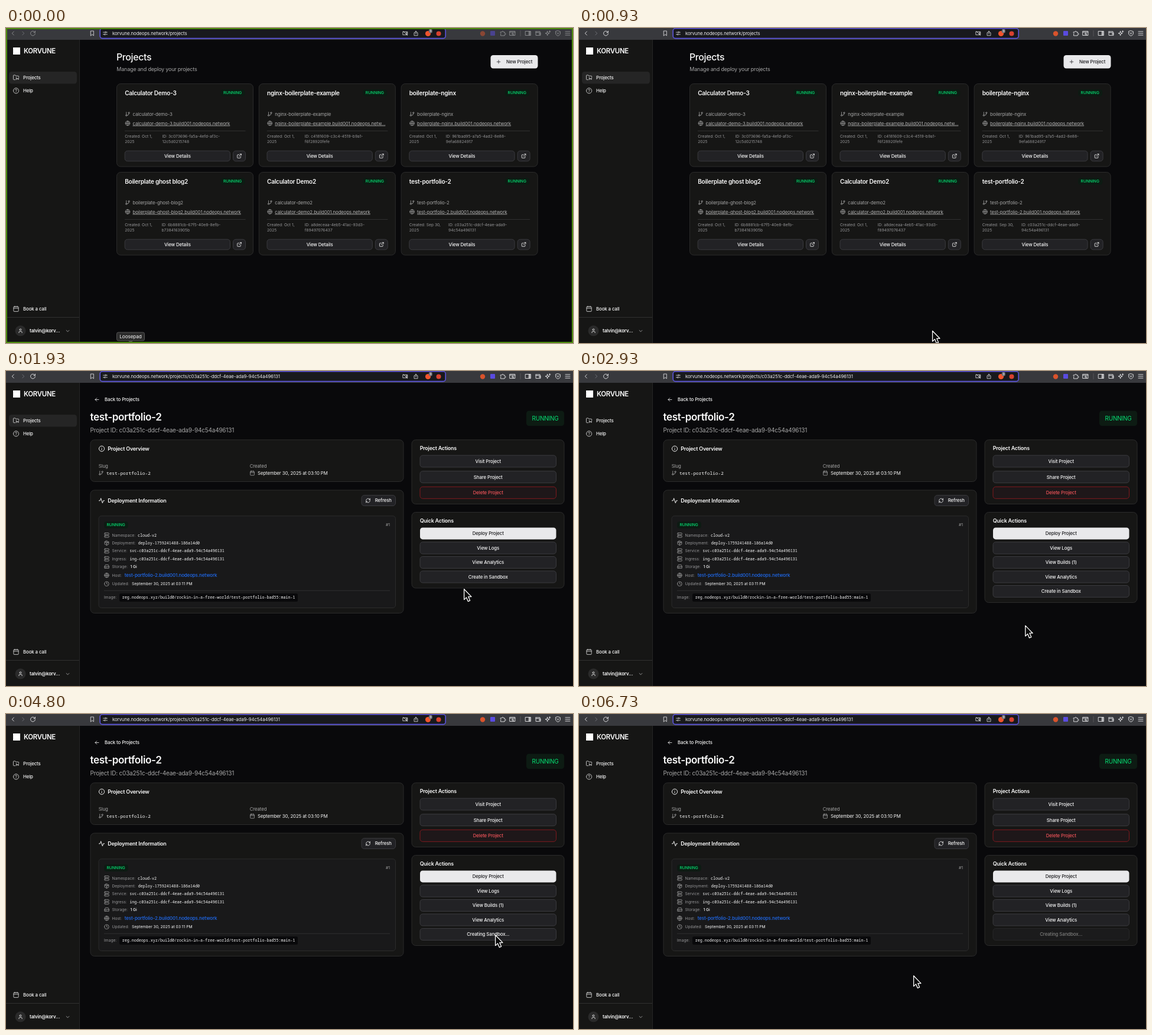
These frames come from a looping animation (960 by 534 pixels, 8000 ms). An HTML page:

```html
<!DOCTYPE html>
<html lang="en">
<head>
<meta charset="utf-8">
<title>Projects</title>
<style>
  html, body { margin: 0; width: 100%; height: 100%; overflow: hidden; background: #09090b; }
  svg { display: block; width: 960px; height: 534px; }
  text { font-family: Inter, sans-serif; white-space: pre; }
  .mono { font-family: "Noto Sans Mono", monospace; }
  .link { text-decoration: underline; text-decoration-thickness: .6px; text-underline-offset: 1.6px; }
</style>
</head>
<body>
<svg id="stage" viewBox="0 0 960 534"></svg>
<script>
const LOOP = 8000;
const WHITE = '#fafafa', GREY = '#a6a6a6', DIM = '#969698', GREEN = '#05df72', INK = '#18181b';
const PANEL = '#161615', LINE = '#2b2b2b', BUTTON = '#222225', EDGE = '#3a3a3e', LIGHT = '#e9e9eb', BADGE = '#0d1b13';

const ring = (x, y, r) => `M${x - r} ${y}a${r} ${r} 0 1 0 ${2 * r} 0a${r} ${r} 0 1 0 ${-2 * r} 0`;
const disc = ring(12, 12, 10);
const ICONS = {
  back: 'M15 5 8 12l7 7',
  forward: 'M9 5l7 7-7 7',
  reload: 'M20 8a9 9 0 1 0 1 5M21 3v6h-6',
  bookmark: 'M6 2h12v20l-6-5-6 5z',
  tune: 'M2 7h8M18 7h4M2 17h4M14 17h8' + ring(14, 7, 3) + ring(10, 17, 3),
  cameraOff: 'M2 5h20v14H2zM3 3l18 18M15 10l4-2v8l-4-2',
  share: 'M8 9H4v13h16V9h-4M12 15V2M8 6l4-4 4 4',
  puzzle: 'M4 7h5a3 3 0 1 1 6 0h4v5a3 3 0 1 1 0 5v4H4v-5a3 3 0 0 0 0-5z',
  search: 'M2 4h20v16H2zM2 8h20M17 18l-2-2' + ring(13, 14, 3),
  sidebar: 'M2 4h20v16H2zM15 4v16M17 4v16M19 4v16',
  wallet: 'M3 5h16v4M3 5v15h18V9H3M21 13h-5v3h5',
  sparkle: 'M10 4l2 6 6 2-6 2-2 7-2-7-6-2 6-2zM19 2v6M16 5h6',
  shield: 'M12 2l9 3v7c0 5-4 8-9 10-5-2-9-5-9-10V5zM8 9l4 6 4-6',
  menu: 'M3 5h18M3 12h18M3 19h18',
  folder: 'M9 20H4a2 2 0 0 1-2-2V5a2 2 0 0 1 2-2h5l2 3h9a2 2 0 0 1 2 2v4M13 12v8M13 14c2 3 4 2 6 2' + ring(20, 17, 2),
  help: disc + 'M9 9a3 3 0 0 1 6 1c0 2-3 2-3 4M12 17h.01',
  calendar: 'M5 4h14a2 2 0 0 1 2 2v14a2 2 0 0 1-2 2H5a2 2 0 0 1-2-2V6a2 2 0 0 1 2-2zM8 2v4M16 2v4M3 10h18',
  user: 'M5 21v-2a4 4 0 0 1 4-4h6a4 4 0 0 1 4 4v2' + ring(12, 7, 4),
  down: 'M5 9l7 7 7-7',
  plus: 'M4 12h16M12 4v16',
  branch: 'M6 3v12M18 9a9 9 0 0 1-9 9' + ring(18, 6, 3) + ring(6, 18, 3),
  globe: disc + 'M2 12h20M12 2a15 15 0 0 1 0 20a15 15 0 0 1 0-20',
  external: 'M15 3h6v6M10 14 21 3M18 13v6a2 2 0 0 1-2 2H5a2 2 0 0 1-2-2V8a2 2 0 0 1 2-2h6',
  left: 'M20 12H4M11 5l-7 7 7 7',
  info: disc + 'M12 16v-4M12 8h.01',
  activity: 'M22 12h-4l-3 9L9 3l-3 9H2',
  refresh: 'M3 12a9 9 0 0 1 15-6.7L21 8M21 3v5h-5M21 12a9 9 0 0 1-15 6.7L3 16M3 21v-5h5',
  server: 'M4 2h16a2 2 0 0 1 2 2v4a2 2 0 0 1-2 2H4a2 2 0 0 1-2-2V4a2 2 0 0 1 2-2zM4 14h16a2 2 0 0 1 2 2v4a2 2 0 0 1-2 2H4a2 2 0 0 1-2-2v-4a2 2 0 0 1 2-2zM6 6h.01M6 18h.01',
  cube: 'M12 2l9 5v10l-9 5-9-5V7zM3 7l9 5 9-5M12 12v10M7.5 4.5l9 5',
  drive: 'M22 12H2l4-8h12zM2 12v7h20v-7M6 16h.01M10 16h.01',
  clock: disc + 'M12 6v6l4 2',
};

const box = (x, y, w, h, r, fill, stroke = 'none', extra = '') =>
  `<rect x="${x}" y="${y}" width="${w}" height="${h}" rx="${r}" fill="${fill}" stroke="${stroke}" ${extra}/>`;
const line = (x1, x2, y) => `<path d="M${x1} ${y}H${x2}" stroke="#303030"/>`;
const icon = (name, x, y, size = 9, color = GREY) =>
  `<path d="${ICONS[name]}" transform="translate(${x - size / 2} ${y - size / 2}) scale(${size / 24})" fill="none" ` +
  `stroke="${color}" stroke-width="2.1" stroke-linecap="round" stroke-linejoin="round"/>`;
// Vertically centred on y; larger sizes are set tighter.
const text = (x, y, s, size = 7.8, fill = WHITE, weight = 400, extra = '') => {
  const spacing = extra.includes('mono') ? 0 : -size * Math.min(.022, Math.max(0, (size - 6.7) * .01));
  return `<text x="${x}" y="${y + .36 * size}" font-size="${size}" fill="${fill}" font-weight="${weight}" letter-spacing="${spacing}" ${extra}>${s}</text>`;
};
const MID = 'text-anchor="middle"', MONO = 'class="mono"';
const mono = (x, y, s, size = 6.7) => text(x, y, s, size, WHITE, 500, MONO);
const group = (id, body) => `<g id="${id}">${body}</g>`;
const panel = (x, y, w, h, id = '') => box(x, y, w, h, 6.7, PANEL, LINE, id && `id="${id}"`);
const button = (x, y, w, label, { h = 20, fill = BUTTON, edge = EDGE, ink = WHITE } = {}) =>
  box(x, y - h / 2, w, h, 4.5, fill, edge) + text(x + w / 2, y, label, 7.8, ink, 500, MID);
const badge = (x, y) => box(x, y - 6, 41, 12, 4.5, BADGE) + text(x + 4.5, y, 'RUNNING', 6.7, GREEN, 500);

function toolbar() {
  const c = '#e4e4e6';
  const tools = [['back', 12], ['reload', 45.5], ['puzzle', 841], ['search', 857.5], ['sidebar', 884],
    ['wallet', 901], ['sparkle', 917.5], ['shield', 934.5], ['menu', 951]];
  return box(0, 0, 960, 20, 0, '#38393d') +
    box(159.2, .8, 585, 16.8, 4, '#18191d', '#5b54dc', 'stroke-width="1.6"') +
    icon('forward', 29, 9, 10, '#77787c') +
    group('tools', tools.map(([n, x]) => icon(n, x, 9, 10.5, c)).join('') +
      '<circle cx="807" cy="9.5" r="4.2" fill="#d9532c"/>' + box(820, 5, 8, 8, 1, '#5a4be0')) +
    '<path d="M871 4v10" stroke="#56575b"/>' +
    icon('bookmark', 146, 9, 9.5, c) + icon('tune', 168, 9, 8.5, c) +
    icon('cameraOff', 676, 9, 9, c) + icon('share', 694, 9, 9, c) +
    '<circle cx="714.5" cy="9.5" r="4.6" fill="#f0532d"/><circle cx="732.5" cy="9.5" r="4" fill="#d8412f"/>' +
    box(715.8, 2, 6, 6.4, 2, '#6d6e74') + text(718.8, 5.2, '3', 5, WHITE, 500, MID) +
    text(180, 9.2, 'korvune.nodeops.network/projects<tspan id="path">/c03a251c-ddcf-4eae-ada9-94c54a496131</tspan>', 7.8, '#ececee');
}

function sidebar() {
  const item = (name, y, label) => icon(name, 17, y, 11, '#c4c4c4') + text(29, y + .2, label, 7.8, WHITE, 500);
  return box(0, 20, 124.5, 514, 0, PANEL) + '<path d="M124.5 20V534" stroke="#262626"/>' +
    box(12, 33, 12, 12, 0, '#fff') + text(30, 38.8, 'KORVUNE', 11.4, '#fff', 600) +
    box(5, 74, 115, 20.5, 4.5, '#252525', 'none', 'id="active"') +
    item('folder', 84, 'Projects') + item('help', 106.3, 'Help') + item('calendar', 476, 'Book a call') +
    line(0, 124, 490.5) + '<circle cx="24.5" cy="513.3" r="9" fill="#2a2a2a"/>' + icon('user', 24.5, 513.3, 9, WHITE) +
    text(40, 513.5, 'talvin@korv...', 7.8, WHITE, 600) + icon('down', 104.5, 513.5, 8, '#d0d0d0');
}

function card([title, slug, host, date, idX, idA, idB], i) {
  const x = 187.5 + 240.8 * (i % 3), y = 94.5 + 150 * Math.floor(i / 3);
  const fine = (dx, dy, s) => text(dx, dy, s, 6.7, DIM);
  return `<g transform="translate(${x} ${y})">` + panel(0, 0, 231, 140.5) +
    text(13.7, 15.8, title, 10, WHITE, 600) + badge(176, 15.5) +
    icon('branch', 18.5, 51.5) + text(27, 51.7, slug, 7.8, GREY) +
    icon('globe', 18.5, 67) + text(27, 67.2, host, 7.8, '#b2b2b2', 400, 'class="link"') +
    line(13.5, 218, 80) + fine(13.7, 89.3, `Created: ${date},`) + fine(13.7, 98, '2025') +
    fine(idX, 89.3, `ID: ${idA}-`) + fine(idX, 98, idB) +
    button(13.7, 122.5, 178.3, 'View Details', { h: 17.5 }) +
    box(197, 113.8, 21, 17.5, 4.5, BUTTON, EDGE) + icon('external', 207.5, 122.5, 9, WHITE) + '</g>';
}

function listPage() {
  const domain = '.build001.nodeops.network';
  const cards = [
    ['Calculator Demo-3', 'calculator-demo-3', '', 'Oct 1', 77, '3c073696-fa5a-4efd-af3c', '12c5d0215748'],
    ['nginx-boilerplate-example', 'nginx-boilerplate-example', '.build001.nodeops.netw...', 'Oct 1', 77.5, 'c4181609-c3c4-4519-b9a1', 'f6f28920fefe'],
    ['boilerplate-nginx', 'boilerplate-nginx', '', 'Oct 1', 75.7, '961bad95-a7a5-4ad2-8e88', '9efa68824917'],
    ['Boilerplate ghost blog2', 'boilerplate-ghost-blog2', '', 'Oct 1', 76, '6b8881cb-67f5-40e8-8efb', 'b7384163905b'],
    ['Calculator Demo2', 'calculator-demo2', '', 'Oct 1', 77.5, 'a8deceaa-4eb5-41ac-93d3', 'f89497076437'],
    ['test-portfolio-2', 'test-portfolio-2', '', 'Sep 30', 80, 'c03a251c-ddcf-4eae-ada9', '94c54a496131'],
  ];
  return text(187, 49, 'Projects', 15.9, WHITE, 500) +
    text(187.3, 70, 'Manage and deploy your projects', 9, GREY) +
    box(820.5, 46, 80, 22.5, 4.5, LIGHT) + icon('plus', 834, 57.3, 8.5, INK) + text(847, 57.3, 'New Project', 7.8, INK, 500) +
    cards.map((c, i) => card([c[0], c[1], c[1] + (c[2] || domain), ...c.slice(3)], i)).join('');
}

function detailPage() {
  const id = 'c03a251c-ddcf-4eae-ada9-94c54a496131';
  const rows = [
    ['server', 278.3, 'Namespace:', 223, 'cloud-v2'],
    ['cube', 291.7, 'Deployment:', 223.7, 'deploy-1759241488-186a14d0'],
    ['server', 305, 'Service:', 209.3, 'svc-' + id],
    ['server', 318.5, 'Ingress:', 209.3, 'ing-' + id],
    ['drive', 331.7, 'Storage:'], ['globe', 346.3, 'Host:'], ['clock', 360.8, 'Updated:'],
  ];
  const action = (y, label, style) => button(701, y, 230.5, label, style);
  return icon('left', 154, 48.5, 9, WHITE) + text(167, 48.5, 'Back to Projects', 7.8, WHITE, 500) +
    text(142.6, 78, 'test-portfolio-2', 17.1, WHITE, 600) + text(142.6, 100, 'Project ID: ' + id, 10, GREY) +
    box(881, 67.5, 64, 25.5, 4.5, BADGE) + text(913, 80.4, 'RUNNING', 10, GREEN, 400, MID) +

    panel(143, 116.7, 530, 70.8) + icon('info', 162, 131.7, 11, WHITE) + text(172.3, 131.8, 'Project Overview', 8.9, WHITE, 600) +
    text(156.7, 161.2, 'Slug', 7.8, GREY) + icon('branch', 161, 173) + mono(170, 173, 'test-portfolio-2', 7.8) +
    text(412.7, 161.2, 'Created', 7.8, GREY) + icon('calendar', 417, 173) + text(426, 173, 'September 30, 2025 at 03:10 PM', 7.8, WHITE, 400) +

    panel(143, 202, 530, 208.5) + icon('activity', 162, 219.8, 11, WHITE) + text(172.3, 219.9, 'Deployment Information', 8.9, WHITE, 600) +
    box(602, 210.7, 57.5, 17.8, 4.5, BUTTON, EDGE) + icon('refresh', 613, 219.6, 9, WHITE) + text(624.7, 219.6, 'Refresh', 7.8, WHITE, 500) +
    box(157, 245.7, 502.5, 155.8, 4.5, '#19191a', LINE) + badge(166, 261) +
    text(650, 261, '#1', 6.7, GREY, 400, 'text-anchor="end"') +
    rows.map(([name, y, label, x, value]) => icon(name, 170.5, y) + text(179.5, y, label, 6.7, DIM) + (value ? mono(x, y, value) : '')).join('') +
    text(210.5, 331.7, '1 Gi', 6.7, WHITE, 500) + text(200.7, 346.3, 'test-portfolio-2.build001.nodeops.network', 7.9, '#1f6bf2', 500) +
    text(213, 360.8, 'September 30, 2025 at 03:11 PM', 6.7) + line(166, 650, 372.3) +
    text(166, 384, 'Image:', 6.7, DIM) + box(192, 377.3, 302, 13.8, 2.5, '#09090b') +
    mono(196.7, 384, 'reg.nodeops.xyz/build0/rockin-in-a-free-world/test-portfolio-bad55:main-1') +

    panel(687, 116.7, 258, 108.8) + text(700.7, 131, 'Project Actions', 8.9, WHITE, 600) +
    action(153, 'Visit Project') + action(179.7, 'Share Project') +
    action(206.3, 'Delete Project', { fill: '#1e1719', edge: '#80191e', ink: '#f2555a' }) +

    panel(687, 239.5, 258, 153, 'quick') + text(700.7, 253.6, 'Quick Actions', 8.9, WHITE, 600) +
    action(275.4, 'Deploy Project', { fill: LIGHT, edge: 'none', ink: INK }) + action(300, 'View Logs') +
    group('partial', action(324.5, 'View Analytics') + action(349, 'Create in Sandbox')) +
    group('full', action(324.5, 'View Builds (1)') + action(349, 'View Analytics') +
      group('create', action(373.5, 'Create in Sandbox')) + group('creating', action(373.5, 'Creating Sandbox...')));
}

const overlay = group('tooltip', box(187.5, 516, 47, 14, 2.5, '#2b2b2b', '#555') +
    '<path d="M207 530.5h8l-4 3.5z" fill="#555"/>' + text(211, 523, 'Loosepad', 8.2, WHITE, 400, MID)) +
  box(1, 1, 958, 532, 0, 'none', '#4c8a0e', 'id="frame" stroke-width="2"') +
  group('cursor',
    '<path id="arrow" d="M.6 .8V18.6L4.5 14.9 7.3 21.6 10.6 20.2 7.8 13.6H13Z" fill="#0a0a0a" stroke="#fff" stroke-width="1.3" stroke-linejoin="round"/>' +
    group('hand', '<path d="M-2.8 3a1.8 1.8 0 0 1 3.6 0V8.6q3-1.4 3.5.5 2.6-1 3.3.9 3-.4 2.9 2.4 0 4-2.2 6.4V20.5H.2Q-1 17-4.4 13.6-6 11.4-4 10.8q1 0 1.8 1.2Z" fill="#fff" stroke="#000" stroke-width=".9"/>' +
      '<path d="M1.6 13.2v4.2M4.1 13.2v4.2M6.6 13.2v4.2" stroke="#000" stroke-width=".8"/>'));

const $ = id => document.getElementById(id);
$('stage').innerHTML = box(0, 0, 960, 534, 0, '#09090b') + group('list', listPage()) + group('detail', detailPage()) +
  sidebar() + toolbar() + overlay;

// Pointer stops: time, x, y
const STOPS = [
  [0, 270, 560], [680, 270, 560], [730, 308, 531], [930, 597, 513], [1230, 776, 379], [1380, 776, 379],
  [1500, 775, 369], [2570, 775, 369], [2850, 751, 434], [2930, 755, 431], [3300, 828, 374], [5270, 828, 374],
  [5530, 774, 443], [6600, 774, 443], [6670, 670, 453], [6730, 566, 443], [LOOP, 566, 443],
];
const slope = (i, k) => {
  const a = STOPS[i - 1], b = STOPS[i], c = STOPS[i + 1];
  return !a || !c || (b[k] - a[k]) * (c[k] - b[k]) <= 0 ? 0 : (c[k] - a[k]) / (c[0] - a[0]);
};
function pointer(t, k) {
  const i = STOPS.findIndex(s => s[0] > t) - 1, a = STOPS[i], b = STOPS[i + 1];
  const d = b[0] - a[0], u = (t - a[0]) / d, v = 1 - u;
  return v * v * (1 + 2 * u) * a[k] + u * u * (3 - 2 * u) * b[k] + d * u * v * (v * slope(i, k) - u * slope(i + 1, k));
}

const ramp = (t, from, to) => Math.min(1, Math.max(0, (t - from) / (to - from)));
const show = (id, on) => $(id).setAttribute('display', on ? 'inline' : 'none');
const fade = (id, value) => $(id).setAttribute('opacity', value);

function render(t) {
  const detail = t >= 1930, loaded = t >= 2000, busy = t >= 4800, focus = ramp(t, 30, 330);
  show('list', !detail);
  show('detail', detail);
  show('path', detail);
  show('active', !loaded);
  show('partial', !loaded);
  show('full', loaded);
  show('create', !busy);
  show('creating', busy);
  $('quick').setAttribute('height', loaded ? 153 : 128.5);
  fade('creating', 1 - .55 * ramp(t, 4825, 4875));
  fade('tools', .5 + .5 * focus);
  fade('frame', 1 - focus);
  fade('tooltip', 1 - ramp(t, 30, 180));

  const x = pointer(t, 1), y = pointer(t, 2);
  const hover = detail ? loaded && !busy && y < 383.5 : y < 376;
  $('cursor').setAttribute('transform', `translate(${x} ${y})`);
  show('hand', hover);
  show('arrow', !hover);
}

function tick() {
  render(performance.now() % LOOP);
  requestAnimationFrame(tick);
}
tick();
</script>
</body>
</html>
```
